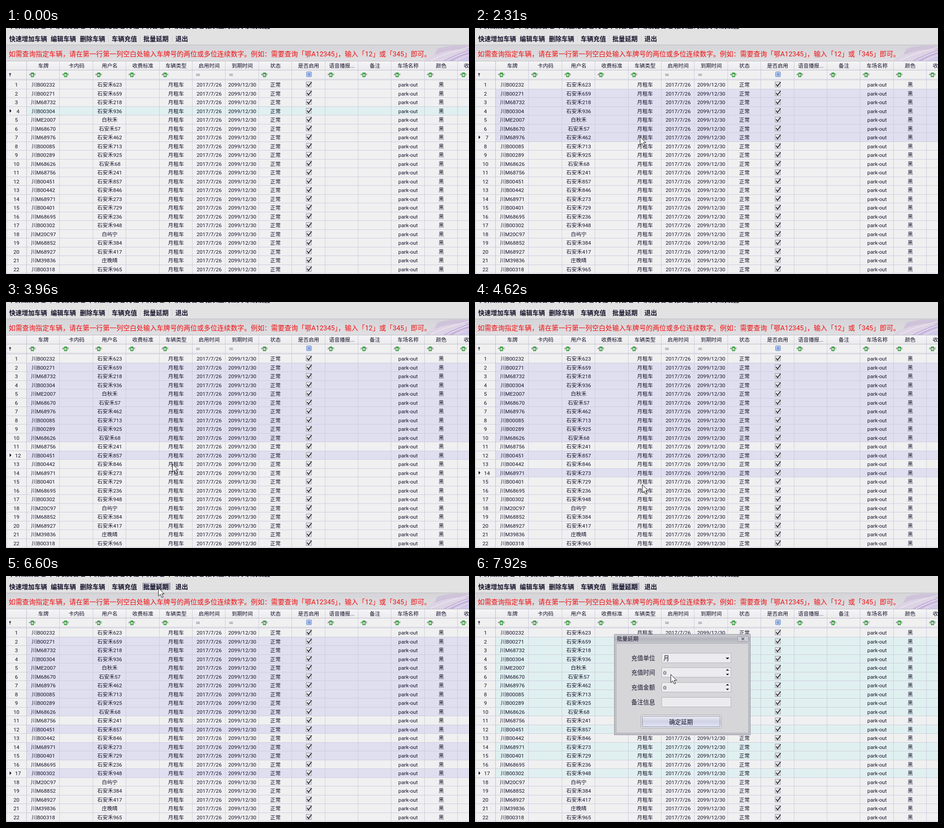
Recreate the animation shown at these times as an HTML page. Size 1025x546 px, loop 8000 ms.

```html
<!DOCTYPE html>
<html lang="zh-CN">
<head>
<meta charset="utf-8">
<style>
html, body { margin: 0; width: 100%; height: 100%; overflow: hidden; background: #f0f0f1; }
svg { display: block; font-family: Roboto, 'Noto Sans CJK SC', 'Noto Sans CJK', sans-serif; fill: #16122a; }
</style>
</head>
<body>
<svg id="stage" width="1025" height="546" viewBox="0 0 1025 546">
  <defs>
    <linearGradient id="bandFill" x2="0" y2="1"><stop stop-color="#d5d4d8"/><stop offset="1" stop-color="#e0dfe2"/></linearGradient>
    <linearGradient id="headFill" x2="0" y2="1"><stop stop-color="#f5f5f6"/><stop offset="1" stop-color="#ebebee"/></linearGradient>
    <linearGradient id="titleFill" x2="0" y2="1"><stop stop-color="#cfcfd6"/><stop offset=".5" stop-color="#b4b4bd"/><stop offset="1" stop-color="#c6c6cd"/></linearGradient>
    <linearGradient id="confirmFill" x2="0" y2="1"><stop stop-color="#eeeef8"/><stop offset=".5" stop-color="#cfd2e4"/><stop offset="1" stop-color="#e4e7f8"/></linearGradient>
    <linearGradient id="pressFill"><stop stop-color="#9a9dab"/><stop offset=".12" stop-color="#bdbfc9"/><stop offset=".88" stop-color="#bdbfc9"/><stop offset="1" stop-color="#9a9dab"/></linearGradient>
    <clipPath id="bandClip"><path d="M0 39H1025V73H0Z"/></clipPath>
  </defs>
  <g id="bars"></g>
  <g id="table"></g>
  <g id="dialog"></g>
  <path id="cursor" d="M.5 .5V18.5L4.7 14.6 8 21.7 11 20.4 7.8 13.6H13.3Z" fill="#fff" stroke="#111"/>
</svg>
<script>
const $ = id => document.getElementById(id);
const rect = (x, y, w, h, fill, more = '') => `<rect x="${x}" y="${y}" width="${w}" height="${h}" fill="${fill}" ${more}/>`;
const path = (d, more) => `<path d="${d}" ${more}/>`;
// Text placed by the vertical centre of its glyphs
const text = (s, x, mid, size = 11.7, more = 'text-anchor="middle"') =>
  `<text x="${x}" y="${mid + size * .37}" font-size="${size}" ${more}>${s}</text>`;

const ROW_H = 19.5, ROW_TOP = 116, COL_W = 73.4, COL_X = 46;
const colX = i => COL_X + i * COL_W;
const rowY = n => ROW_TOP + (n - 1) * ROW_H;

const headers = ['车牌', '卡内码', '用户名', '收费标准', '车辆类型', '启用时间', '到期时间', '状态',
  '是否启用', '语音播报...', '备注', '车场名称', '颜色', '收费规则'];
const plates = ('B00232 B00271 M68732 B00304 ME2007 M68670 M68976 B00085 B00289 M68626 M68756 ' +
  'B00451 B00442 M68971 B00401 M68695 B00302 M20C97 M68852 M68927 M39836 B00318').split(' ');
const users = [623, 659, 218, 936, '白秋禾', 57, 462, 713, 925, 68, 241, 857, 846, 273, 729, 236, 948,
  '白屿宁', 384, 417, '庄晚晴', 965].map(u => u > 0 ? '石安禾' + u : u);

function drawBars() {
  const left = (s, x, mid, size, more = '') => text(s, x, mid, size, more);
  let out = rect(0, 0, 1025, 38, '#e2e2e3') +
    left('车辆档案管理 车场收费管理 车辆登记管理 月租车辆管理 车场设备管理 报表查询工具 系统设置', 4, -5, 14, 'font-weight="bold"') +
    rect(0, 38, 1025, 36, 'url(#bandFill)') + rect(0, 37, 1025, 1, '#bcbcc0');
  out += '<g clip-path="url(#bandClip)">' +
    path('M925 74Q955 44 1025 36V74Z', 'fill="#dcd3e4"') +
    path('M955 46Q985 36 1025 40V48Q985 45 948 60Z', 'fill="#cfc3da"') +
    path('M966 74Q992 60 1025 48V58Q1003 64 988 74Z', 'fill="#c5b2dc"') +
    path('M998 74Q1010 66 1025 62V74Z', 'fill="#d0c6ea"') +
    path('M940 72Q975 55 1025 43M976 73Q1000 60 1025 52', 'fill="none" stroke="#eee8f2" stroke-width="1.5"') + '</g>';
  out += rect(302, 15, 62, 16, 'url(#pressFill)', 'id="press"');
  [['快速增加车辆', 7], ['编辑车辆', 99], ['删除车辆', 163.5], ['车辆充值', 234], ['批量延期', 304], ['退出', 375]]
    .forEach(([s, x]) => out += left(s, x, 23.5, 14, 'font-weight="bold"'));
  [227, 297, 368].forEach(x => out += rect(x, 16, 1, 15, '#c2c2c8') + rect(x + 1, 16, 1, 15, '#f4f4f4'));
  out += left('如需查询指定车辆，请在第一行第一列空白处输入车牌号的两位或多位连续数字。例如：需要查询「鄂A12345」，输入「12」或「345」即可。',
    6, 57, 14.9, 'fill="#f01010"');
  $('bars').innerHTML = out;
}

function filterIcon(i) {
  const x = colX(i) + 5;
  if (i == 5 || i == 6) return path(`M${x + 3} 102.5h8m-8 3h8`, 'stroke="#667"');
  if (i == 8) return rect(665.5, 97.5, 10.5, 10.5, '#c3d6f6', 'stroke="#4b70bd" rx="1"') +
    rect(668, 100, 6, 6, '#7f9fdd');
  return text('A', x + 2, 103, 6) + rect(x + 4, 99, 7, 10, '#2f9a35', 'rx="1"') +
    text('B', x + 7.5, 104, 8, 'text-anchor="middle" fill="#fff" font-weight="bold"') + text('C', x + 13, 103, 6);
}

function drawTable() {
  let out = rect(0, 74, 1025, 472, '#f0f0f1') + rect(0, 74, 1025, 19, 'url(#headFill)');
  plates.forEach((p, i) => out += rect(COL_X, rowY(i + 1), 979, ROW_H, 'none', `id="bg${i + 1}"`));
  let lines = 'M0 113.5H1025M0 115.5H1025M1.5 74V546';
  for (let i = 1; i < 14; i++) lines += `M${Math.round(colX(i)) - .5} 74V546`;
  for (let n = 2; n < 24; n++) lines += `M0 ${Math.round(rowY(n)) - .5}H1025`;
  out += path(lines, 'stroke="#cbcbdc"') + path('M0 73.5H1025M0 93.5H1025M45.5 74V546', 'stroke="#bcbcc8"');
  headers.forEach((h, i) => out += text(h, colX(i) + COL_W / 2, 84) + filterIcon(i));
  out += '<circle cx="9" cy="102" r="2"/><circle cx="9" cy="102" r=".7" fill="#fff"/>' + rect(8.5, 104, 1, 4, '#222');
  plates.forEach((p, i) => {
    const n = i + 1, y = rowY(n) + 10;
    const cells = ['川' + p, '', users[i], '', '月租车', '2017/7/26', '2099/12/30', '正常', '', '', '', 'park-out', '黑'];
    out += `<g id="no${n}">${text(n, 23, y)}</g>`;
    cells.forEach((c, k) => { if (c) out += text(c, colX(k) + COL_W / 2, y); });
    out += rect(664.5, y - 6.5, 11.5, 11.5, '#e4e4e8', 'stroke="#92929c"') +
      path(`M666.5 ${y - 1.5}l3.2 4.5 6.8-9`, 'fill="none" stroke="#2b2b35" stroke-width="2"');
  });
  out += path('M8 -4l4 4 -4 4z', 'id="marker"');
  $('table').innerHTML = out;
}

function drawDialog() {
  let out = rect(308.5, 129.5, 301, 223, '#c3c3cb', 'stroke="#8e8e9a"') + rect(309, 130, 300, 19, 'url(#titleFill)') +
    rect(312.5, 149.5, 293, 199, '#d6d6d8', 'stroke="#aaaab4"') +
    text('批量延期', 314, 139.5, 12, '') +
    rect(581.5, 133.5, 24, 12, '#cdcdd4', 'stroke="#92929e" rx="1"') +
    path('M590 136.5l6 6m0-6l-6 6', 'stroke="#555560" stroke-width="1.5"');
  [['充值单位', 171, '月'], ['充值时间', 203, 0], ['充值金额', 236, 0], ['备注信息', 269, '']].forEach(([label, y, value], i) => {
    out += text(label, 346, y + 10.7, 13.2, '') +
      rect(413.5, y + .5, 153, 21, '#ececee', 'stroke="#b2b2bd"') +
      text(value, 417, y + 11.5, 13.2, `font-family="${i ? 'Liberation Serif' : 'Noto Sans CJK SC'}, serif"`);
    if (i == 0) out += path('M555 181h8l-4 4z', '');
    if (i == 1 || i == 2) out += path(`M555.5 ${y + 7}h7l-3.5-3.5zM555.5 ${y + 14}h7l-3.5 3.5z`, '');
  });
  out += rect(367.5, 308.5, 178, 29, '#f6f6fa', 'stroke="#9a9aa8" rx="2"') + rect(369, 310, 175, 26, 'url(#confirmFill)') +
    rect(370.5, 311.5, 172, 23, 'none', 'stroke="#333" stroke-dasharray="1 1"') + text('确定延期', 456, 324, 13.2);
  $('dialog').innerHTML = out;
}

// start time, pointer x, pointer y, current row
const steps = [
  [0, -50, -50, 4], [330, 492, 297, 4], [660, 358, 160, 4], [990, 355, 156, 2], [1320, 355, 168, 2],
  [2310, 365, 241, 7], [2640, 367, 304, 7], [2970, 367, 306, 10], [3300, 368, 322, 10], [3630, 368, 342, 10],
  [3960, 368, 359, 12], [4290, 369, 379, 14], [4620, 370, 405, 14], [4950, 372, 437, 15], [5280, 374, 430, 17],
  [5610, 248, 48, 17], [5940, 349, 22, 17], [6270, 337, 26, 17], [7260, 390, 151, 17],
  [7590, 427, 212, 17], [7920, 433, 218, 17]
];
const skipped = [11, 13, 16];
const isSelected = (n, current) => current == 4 ? n == 4 : n > 1 && n <= current && !skipped.includes(n);

function render(t) {
  const [, x, y, current] = steps.findLast(s => s[0] <= t);
  const tint = t < 990 || t >= 6930 ? '#e0f0f0' : '#e0dff0';
  plates.forEach((p, i) => {
    const n = i + 1;
    $('bg' + n).setAttribute('fill', isSelected(n, current) ? tint : 'none');
    $('no' + n).setAttribute('transform', `translate(${n == current ? 3.5 : 0})`);
  });
  $('marker').setAttribute('transform', `translate(0 ${rowY(current) + 9.5})`);
  $('cursor').setAttribute('transform', `translate(${x} ${y})`);
  $('dialog').style.display = t >= 6930 ? '' : 'none';
  $('press').style.opacity = t < 6270 ? 0 : t < 6600 ? .6 : t < 6930 ? 1 : .85;
}

drawBars();
drawTable();
drawDialog();
const start = performance.now();
function tick() {
  render((performance.now() - start) % 8000);
  requestAnimationFrame(tick);
}
tick();
</script>
</body>
</html>
```
